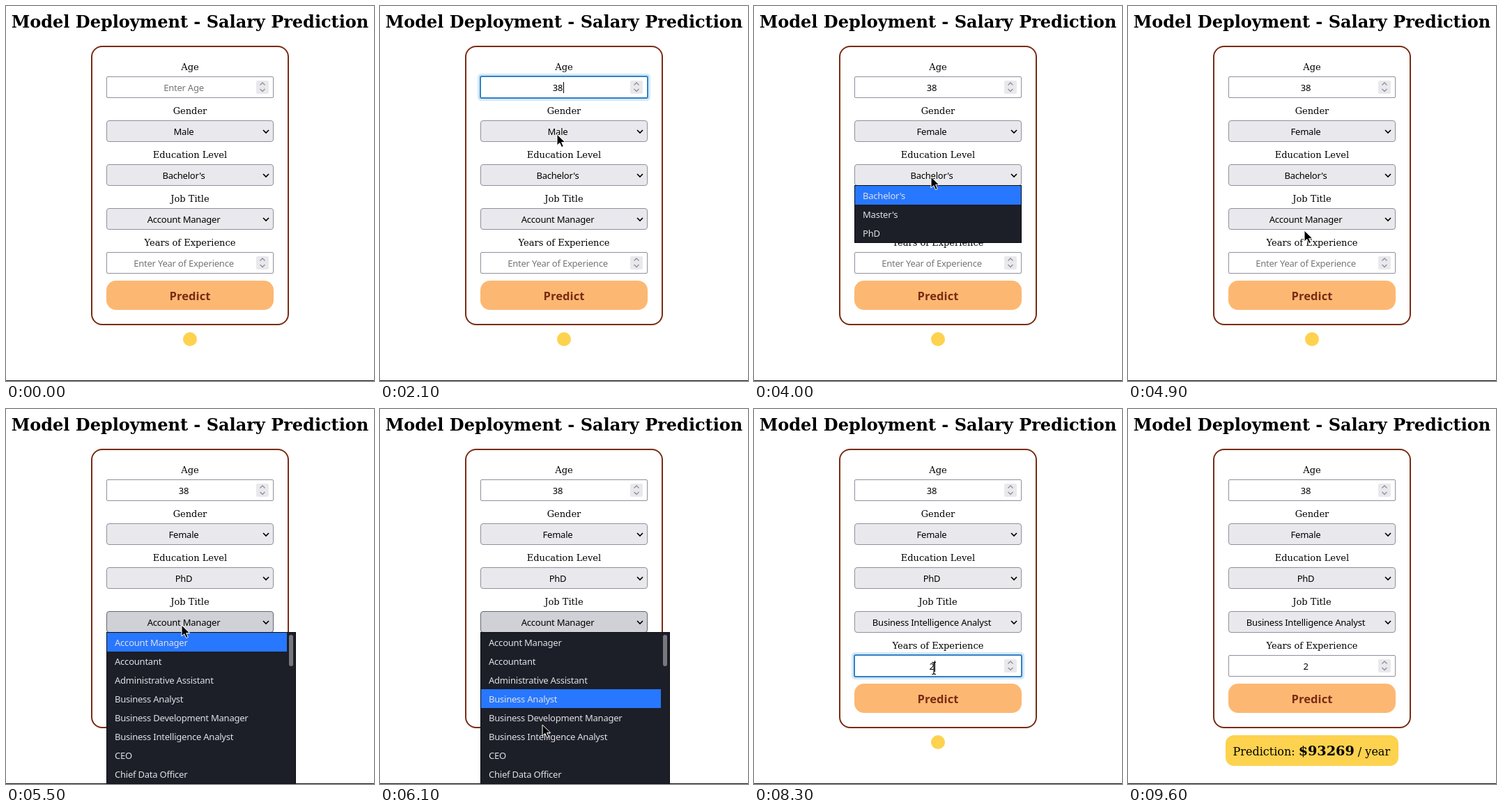
An HTML page for the animation above (9.9 s loop, 528x538 px).

```html
<!DOCTYPE html>
<html lang="en">
<head>
<meta charset="utf-8">
<title>Salary Prediction</title>
<style>
  html, body { margin: 0; width: 100%; height: 100%; overflow: hidden; background: #fff; }
  svg { display: block; }
  text { white-space: pre; }
  .serif { font-family: "DejaVu Serif", serif; }
  .ui { font: 13px "Noto Sans", sans-serif; letter-spacing: -.22px; }
  .button { font: 700 16.5px "Noto Sans", sans-serif; letter-spacing: .1px; fill: #792b13; }
  .mid { text-anchor: middle; }
</style>
</head>
<body>
<svg id="stage" width="528" height="538" viewBox="0 0 528 538"></svg>
<script>
const LOOP = 9900, TICK = 100, LAST = 96;
const MOVE = 3, TYPE_DELAY = 5, TYPE_STEP = 4, PICK_DELAY = 2, RESULT = 89;
const stage = document.getElementById('stage');

// open and close are ticks: the time a field has focus or shows its list.
const fields = [
  { label: 'Age', hint: 'Enter Age', goal: '38', open: 11, close: 23 },
  { label: 'Gender', list: ['Female', 'Male'], first: 'Male', goal: 'Female', open: 24, close: 33 },
  { label: 'Education Level', list: ["Bachelor's", "Master's", 'PhD'],
    first: "Bachelor's", goal: 'PhD', open: 39, close: 48 },
  { label: 'Job Title', list: ['Account Manager', 'Accountant', 'Administrative Assistant',
    'Business Analyst', 'Business Development Manager', 'Business Intelligence Analyst',
    'CEO', 'Chief Data Officer'],
    first: 'Account Manager', goal: 'Business Intelligence Analyst', open: 53, close: 66 },
  { label: 'Years of Experience', hint: 'Enter Year of Experience', goal: '2', open: 75, close: 86 }
];
fields.forEach((f, i) => f.y = 101 + 63 * i);

// Pointer stops [arrival tick, x, y]; each move takes MOVE ticks.
const stops = [
  [6, 430, 465], [10, 268, 122], [21, 254, 184], [28, 257, 218], [36, 254, 245], [46, 253, 322],
  [52, 252, 310], [61, 233, 453], [64, 234, 470], [71, 249, 404], [75, 258, 372], [86, 255, 412],
  [95, 420, 470]
];

function pointer(k) {
  const n = stops.findIndex(s => s[0] > k);
  if (n < 1) return null;
  const [, x, y] = stops[n - 1], [end, x2, y2] = stops[n];
  const u = Math.max(0, 1 - (end - k) / MOVE);
  return { x: Math.round(x + (x2 - x) * u), y: Math.round(y + (y2 - y) * u) };
}

const isOpen = (f, k) => k >= f.open && k < f.close;
const inside = (p, y, h) => !!p && p.x >= 144 && p.x < 384 && p.y >= y && p.y < y + h;

function valueOf(f, k) {
  if (f.list) return k < f.close + PICK_DELAY ? f.first : f.goal;
  const typed = Math.floor((k - f.open - TYPE_DELAY) / TYPE_STEP) + 1;
  return f.goal.slice(0, Math.max(0, typed));
}

const rect = (x, y, w, h, fill, rx = 0, extra = '') =>
  `<rect x="${x}" y="${y}" width="${w}" height="${h}" rx="${rx}" fill="${fill}" ${extra}/>`;
const box = (x, y, w, h, fill, rx, stroke) =>
  rect(x + .5, y + .5, w - 1, h - 1, fill, rx, `stroke="${stroke}"`);
const text = (x, y, s, cls, extra = '') => `<text x="${x}" y="${y}" class="${cls}" ${extra}>${s}</text>`;
const line = (d, color, w) => `<path d="${d}" fill="none" stroke="${color}" stroke-width="${w}"/>`;

function selectBox(f, k) {
  const hot = isOpen(f, k) && f.list.length > 5;
  return box(144, f.y, 240, 31, hot ? '#d0d0d7' : '#e9e9ed', 3.5, hot ? '#676774' : '#8f8f9d') +
    line(`M369 ${f.y + 14}l4 4l4 -4`, '#000', 1.7);
}

function inputBox(f, k) {
  const { y } = f, mid = y + 15.5, active = isOpen(f, k);
  let out = active
    ? rect(140, y - 4, 248, 39, '#d3e9f8', 5) +
      rect(144, y, 240, 31, '#fff', 2, 'stroke="#3580c4" stroke-width="2"')
    : box(144, y, 240, 31, '#fff', 1.5, '#8f8f9d');
  out += rect(359, y + 6, 18, 19, '#e9e9ed', 2);
  out += line(`M364.5 ${mid - 3}l3.5 -3.5l3.5 3.5M364.5 ${mid + 2.5}l3.5 3.5l3.5 -3.5`, '#8f8f98', 1.3);
  if (active) out += rect(255 + valueOf(f, k).length * 4, y + 8, 1, 16, '#000');
  return out;
}

function field(f, k) {
  const value = valueOf(f, k);
  return text(264, f.y - 9, f.label, 'serif mid', 'font-size="13"') +
    (f.list ? selectBox(f, k) : inputBox(f, k)) +
    text(255, f.y + 21, value || f.hint, 'ui mid', value ? '' : 'fill="#757575"');
}

function popup(f, k) {
  const long = f.list.length > 5, top = f.y + 30;
  const hover = pointer(k - 1); // the highlight trails the pointer by one tick
  const under = hover ? Math.floor((hover.y - top - 1) / 27) : -1;
  const lit = f.list[under] ? under : f.list.indexOf(f.first);
  let out = box(144, top, long ? 272 : 240, long ? 220 : f.list.length * 27 + 2, '#1c1e28', 0, '#0b0c10');
  f.list.forEach((name, n) => {
    const y = top + 1 + n * 27;
    if (n === lit) out += rect(145, y, long ? 258 : 238, 27, '#2777ff');
    out += text(156, y + 19, name, 'ui', 'fill="#e0e0e4"');
  });
  if (long) out += rect(406, top + 4, 6, 45, '#77787d', 3);
  return out;
}

const shapes = {
  arrow: '<path d="M0 0V16L3.8 12.6L6.6 18.6L9.3 17.4L6.6 11.6H11.8Z" fill="#000" stroke="#fff" stroke-linejoin="round"/>',
  beam: '<path d="M-3 -8.5H-1L0 -7.5L1 -8.5H3M0 -7.5V7.5M-3 8.5H-1L0 7.5L1 8.5H3" fill="none" stroke="#000" stroke-width="1.2"/>',
  hand: '<path d="M-1.5 0.5Q0 -1 1.5 0.5V5L4 5.3L6.5 6L8.5 7.5V11L7 15H-1L-4.5 10.5L-4.5 8.5L-3 8L-1.5 9.5Z" ' +
    'fill="#000" stroke="#fff" stroke-linejoin="round"/>'
};

function cursor(p, list) {
  if (!p) return '';
  let kind = 'arrow';
  if (!list && inside(p, 394, 42)) kind = 'hand';
  else if (!list && fields.some(f => f.hint && inside(p, f.y, 31))) kind = 'beam';
  return `<g transform="translate(${p.x} ${p.y})">${shapes[kind]}</g>`;
}

function draw(k) {
  const p = pointer(k), list = fields.find(f => f.list && isOpen(f, k));
  const hot = !list && inside(p, 394, 42);
  let out = rect(0, 0, 528, 538, '#fff');
  out += text(264, 31, 'Model Deployment - Salary Prediction', 'serif mid', 'font-size="24" font-weight="700"');
  out += rect(123, 58, 282, 399, '#fff', 15, 'stroke="#792b13" stroke-width="2"');
  out += fields.map(f => field(f, k)).join('');
  out += rect(144, 394, 240, 42, hot ? '#fa9139' : '#fcb872', 14);
  out += text(264, 422, 'Predict', 'button mid');
  if (k >= RESULT) {
    out += rect(140, 468, 248, 44, '#fdd24e', 12);
    out += text(150.5, 497,
      'Prediction: <tspan font-size="19.2" font-weight="700">$93269</tspan> / year', 'serif', 'font-size="16"');
  } else {
    out += rect(254, 468, 20, 20, '#fdd24e', 10);
  }
  if (list) out += popup(list, k);
  out += rect(0, 537, 528, 1, '#111');
  stage.innerHTML = out + cursor(p, list);
}

let shown = -1;
function frame() {
  let k = Math.min(Math.floor(performance.now() % LOOP / TICK), LAST);
  if (k % 5 === 2) k--; // every fifth tick is held
  if (k !== shown) draw(shown = k);
  requestAnimationFrame(frame);
}
frame();
</script>
</body>
</html>
```
